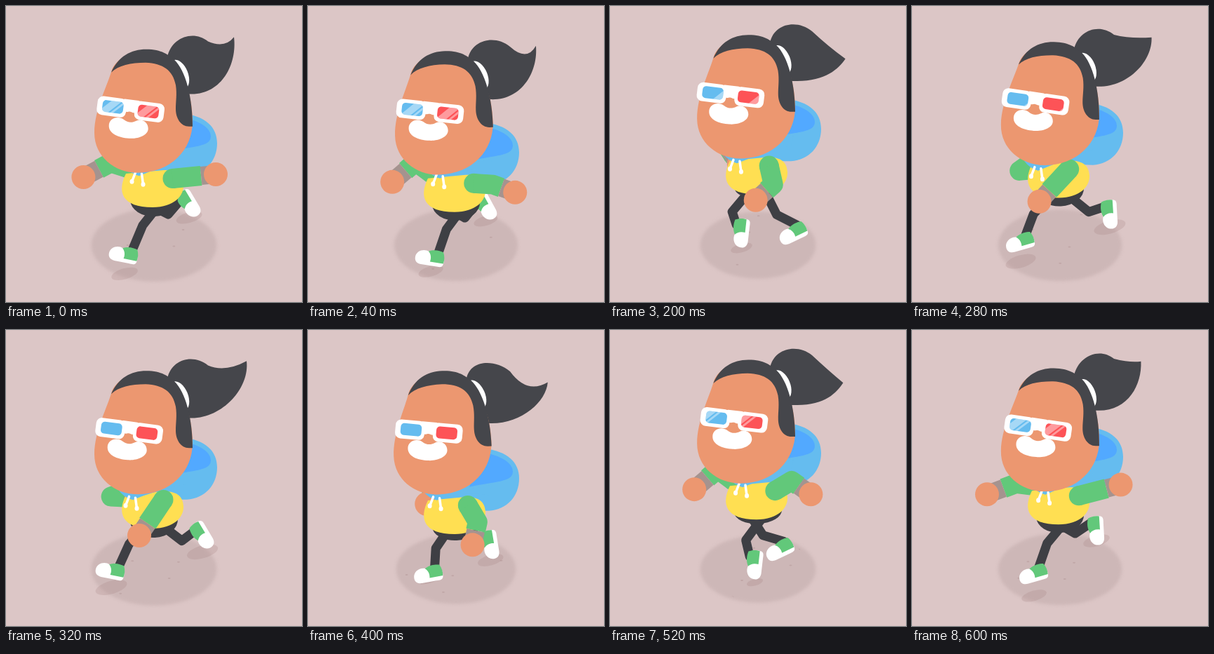
An HTML page with a canvas that plays this animation: 422x422 px, repeating every 640 ms.

```html
<!DOCTYPE html>
<html lang="en">
<head>
<meta charset="utf-8">
<title>Runner</title>
<style>
  html, body { margin: 0; width: 100%; height: 100%; overflow: hidden; background: #dcc6c6; }
  canvas { display: block; }
</style>
</head>
<body>
<canvas id="stage" width="422" height="422"></canvas>
<script>
const ctx = document.getElementById('stage').getContext('2d');
const LOOP = 640, STEP = 40, HALF = Math.PI;
const C = {
  bg: '#dcc6c6', ground: '#cdb7b7', speck: '#c0a7a7', skin: '#ec9770', hair: '#45464b',
  pants: '#3e3f44', yellow: '#ffdf52', green: '#62c87a', cuff: '#a5938f',
  hood: '#65bcef', lining: '#52a9ff', red: '#fd5357', white: '#ffffff'
};
const { cos, sin, hypot, sqrt } = Math;
const rad = d => d * Math.PI / 180;

// Basic drawing

function fill(color, d) {
  ctx.fillStyle = color;
  ctx.fill(new Path2D(d));
}

function oval(color, x, y, rx, ry = rx, rot = 0) {
  ctx.fillStyle = color;
  ctx.beginPath();
  ctx.ellipse(x, y, rx, ry, rad(rot), 0, 7);
  ctx.fill();
}

function line(color, width, cap, ...pts) {
  ctx.strokeStyle = color;
  ctx.lineWidth = width;
  ctx.lineCap = cap;
  ctx.lineJoin = 'round';
  ctx.beginPath();
  pts.forEach(p => ctx.lineTo(p[0], p[1]));
  ctx.stroke();
}

function box(color, x, y, w, h, r) {
  ctx.fillStyle = color;
  ctx.beginPath();
  ctx.roundRect(x, y, w, h, r);
  ctx.fill();
}

function placed(x, y, deg, draw) {
  ctx.save();
  ctx.translate(x, y);
  ctx.rotate(rad(deg));
  draw();
  ctx.restore();
}

// Ground

function ground(t, scale) {
  ctx.save();
  ctx.filter = 'blur(2px)';
  oval(C.ground, 211, 341, 82 * scale, 47.5 * scale);
  ctx.restore();
  ctx.save();
  ctx.beginPath();
  ctx.ellipse(211, 341, 78 * scale, 44 * scale, 0, 0, 7);
  ctx.clip();
  for (let i = 0; i < 14; i++) {
    const run = ((i * .618 + t / LOOP) % 1 - .5) * 344;
    const lane = (i * 37 % 71) - 35;
    oval(C.speck, 211 + run + lane * .5, 341 - run * .59 + lane, 2, 1);
  }
  ctx.restore();
}

function footShadow(x, base) {
  const r = 10 + Math.abs(x - 215) * .2;
  oval('rgba(160,122,124,.22)', x + 1, base - .59 * x, r, r * .4, -16);
}

// Legs: the far one runs half a cycle behind the near one.

function legPose(w, dx, dy, hip) {
  const x = 228 - 55.5 * cos(w) + 7 * sin(w) - 4.4 * cos(2 * w) - 3 * sin(2 * w) + dx;
  const y = 328.3 + 30.5 * cos(w) + 7 * sin(w) - 4.8 * cos(2 * w) + 3.9 * sin(2 * w) + dy;
  const angle = -52 + 48 * cos(w) + 33 * sin(w) + 18 * cos(3 * w);
  const c = cos(rad(angle)), s = sin(rad(angle));
  const ankle = [x + 10 * c + 8 * s, y + 10 * s - 8 * c];
  const knee = [
    (hip[0] + ankle[0]) / 2 - 6 - 6 * cos(w) + 3 * sin(w) + 7 * cos(2 * w),
    (hip[1] + ankle[1]) / 2 + 8 - 10 * cos(w) - 2 * sin(w)
  ];
  return { x, y, angle, ankle, knee, hip };
}

function leg({ x, y, angle, ankle, knee, hip }) {
  line(C.pants, 13, 'round', hip, knee, ankle);
  placed(x, y, angle, () => {
    fill(C.white, 'M-21 3C-21-6-11-11-3-8L16-10C20-6 21 1 20 7C19 11 15 11 10 11L-11 12C-17 12-21 9-21 3Z');
    fill(C.green, 'M-4-8C4-13 12-12 17-11C20-6 21 0 20 5L1 6C2 0 0-5-4-8Z');
  });
}

// Arms

function elbow([ax, ay], [bx, by], upper, lower, side) {
  const d = hypot(bx - ax, by - ay), ux = (bx - ax) / d, uy = (by - ay) / d;
  const along = (upper * upper - lower * lower + d * d) / (2 * d);
  const out = side * sqrt(Math.max(0, upper * upper - along * along));
  return [ax + ux * along + uy * out, ay + uy * along - ux * out];
}

function arm(shoulder, hand, upper, lower, side, reach) {
  const bend = elbow(shoulder, hand, upper, lower, side);
  const k = reach / hypot(bend[0] - hand[0], bend[1] - hand[1]);
  const wrist = hand.map((h, i) => h + (bend[i] - h) * k);
  oval(C.green, ...shoulder, 14);
  line(C.green, 28, 'butt', shoulder, bend, wrist);
  line(C.cuff, 26, 'butt', wrist, hand);
  oval(C.skin, ...hand, 17);
}

// Clothes

function hoodBack(hy, nx, ny) {
  fill(C.hood, `M${nx} ${ny}C215 ${hy + 42} 235 ${hy + 46} 258 ${hy + 46}
    C284 ${hy + 44} 301 ${hy + 25} 301 ${hy}C301 ${hy - 23} 285 ${hy - 39} 250 ${hy - 43}Z`);
  fill(C.lining, `M250 ${hy - 37}C275 ${hy - 33} 292 ${hy - 22} 292 ${hy - 10}
    C292 ${hy + 5} 268 ${hy + 4} 230 ${hy + 12}Z`);
}

function hoodFront(hy, nx, ny) {
  fill(C.hood, `M${nx - 20} ${ny - 14}Q${nx - 12} ${ny - 3} ${nx} ${ny}
    Q${nx + 34} ${ny - 14} 258 ${hy + 24}L262 ${hy + 10}L232 ${hy + 14}L200 ${ny - 30}Z`);
  [[-5, -5, -10, 8], [4, -3, 6, 12]].forEach(([x, y, x2, y2]) => {
    line(C.white, 3.5, 'round', [nx + x, ny + y], [nx + x2, ny + y2]);
    oval(C.white, nx + x2, ny + y2, 3, 3.5);
  });
}

function hoodie(by, depth) {
  oval(C.pants, 211, by - 12, 34, 12 + depth, -3);
  fill(C.yellow, `M171 ${by - 48}C158 ${by - 22} 165 ${by} 209 ${by}
    C240 ${by} 254 ${by - 17} 253 ${by - 32}C252 ${by - 48} 241 ${by - 53} 225 ${by - 53}Z`);
}

// Head

function ponytail(w, dx, dy) {
  const c = cos(2 * w), s = sin(2 * w);
  const tx = 334 - 9 * cos(w) - 2 * sin(w), ty = 66 - 21.7 * c + 8.5 * s;
  const my = 47 + 3.5 * c + 12 * s, curl = 69 - 8 * c + 23 * s;
  const root = 120 + 5.5 * c + 13 * s, drop = root - ty;
  const ax = 230 + dx, ay = 73 + dy, bx = 262 + dx;
  fill(C.hair, `M${ax} ${ay}C${ax + 6} ${ay - 28} 267 ${my - 17} 288 ${my}
    Q312 ${curl} ${tx} ${ty}
    C${tx + (drop - 65) * .3} ${ty + drop * .48} ${bx + 45} ${root + 2} ${bx} ${root}L${bx - 20} ${root}Z`);
}

function lens(color, x, shine) {
  ctx.save();
  box(color, x - 15, -8, 30, 17, 5);
  ctx.clip();
  // slanted glints: one wide, one thin ahead of it
  [[shine - 7, 14], [shine + 10, 4]].forEach(([u, width]) => {
    const a = x + u, b = a + width;
    fill('rgba(255,255,255,.42)', `M${a + 12}-12L${b + 12}-12L${b - 12} 12L${a - 12} 12Z`);
  });
  ctx.restore();
}

function face(t) {
  fill(C.white, `M147 171C147 160 160 156 168 162C174 167 180 167 186 164
    C194 160 203 166 203 175C203 185 188 190 176 189C160 188 147 182 147 171Z`);
  const shine = -25 + ((t - 440 + LOOP) % LOOP) * .106;
  placed(178, 147, 7.5, () => {
    box(C.white, -48, -13, 42, 27, 8);
    box(C.white, 6, -13, 42, 27, 8);
    box(C.white, -12, -13, 24, 18, 2);
    oval(C.skin, 0, 10, 6.5, 6);
    lens(C.hood, -25.5, shine);
    lens(C.red, 25.5, shine);
  });
}

function drawHead(t, w, dx, dy) {
  const tilt = -.9 + .9 * cos(2 * w) - 1.4 * sin(2 * w);
  const slide = -1.3 + cos(w) - 2.3 * sin(w);
  placed(196 + dx, 175 + dy, tilt, () => {
    ctx.translate(-196, -175);
    oval(C.white, 247, 98, 12.5, 22, -22);
    fill(C.skin, `M151 91C145 113 126 148 126 181C126 215 155 238 188 238
      C235 238 266 205 266 165C266 130 255 90 225 70C195 55 160 70 151 91Z`);
    fill(C.hair, `M150 95C160 72 178 62 200 62C222 62 232 70 240 77C256 92 266 130 266 172
      L261 172C249 172 242 160 242 147C242 136 244 126 242 113C238 92 224 82 199 81C178 81 160 85 150 95Z`);
    ctx.translate(slide, 0);
    face(t);
  });
}

function draw(t) {
  // One turn of w is two strides; the body bobs once per stride.
  const w = t / LOOP * 2 * HALF;
  const c = cos(2 * w), s = sin(2 * w);
  const by = 280.7 + 4.3 * c + 11.7 * s + 2 * cos(w);
  const hy = 192 + 3.8 * c + 19.8 * s;
  const nx = 185 + 4.5 * cos(w) - 2.5 * sin(w), ny = 235 + 7.3 * c + 7.8 * s;
  const dx = -2 + 2 * c - 2.1 * s, dy = -9.6 + 7.6 * c + 7.1 * s + 1.7 * cos(w);
  const near = legPose(w, 0, 0, [220, by - 6]);
  const far = legPose(w + HALF, -19, -11, [200, by - 6]);

  ctx.fillStyle = C.bg;
  ctx.fillRect(0, 0, 422, 422);
  ground(t, 1.04 + .05 * c);
  footShadow(far.x, 455);
  footShadow(near.x, 481);
  hoodBack(hy, nx, ny);
  arm([176, by - 55], [152 - 45 * cos(w + HALF / 8), by - 43], 28, 44, -1, 25);
  leg(far);
  leg(near);
  hoodie(by, 9 + 4 * c);
  hoodFront(hy, nx, ny);
  arm(
    [231 + 6.5 * cos(w) - 2 * sin(w), by - 41],
    [249.8 + 54.5 * cos(w) - 20 * sin(w) - 5.3 * c + 9.2 * s,
      270.6 - 26.5 * cos(w) + 12 * sin(w) - 4.1 * c + 25.5 * s],
    27.5, 33.5, 1, 21
  );
  ponytail(w, dx, dy);
  drawHead(t, w, dx, dy);
}

const start = performance.now();
function tick() {
  const t = (performance.now() - start) % LOOP;
  draw(Math.floor(t / STEP) * STEP);
  requestAnimationFrame(tick);
}
tick();
</script>
</body>
</html>
```
